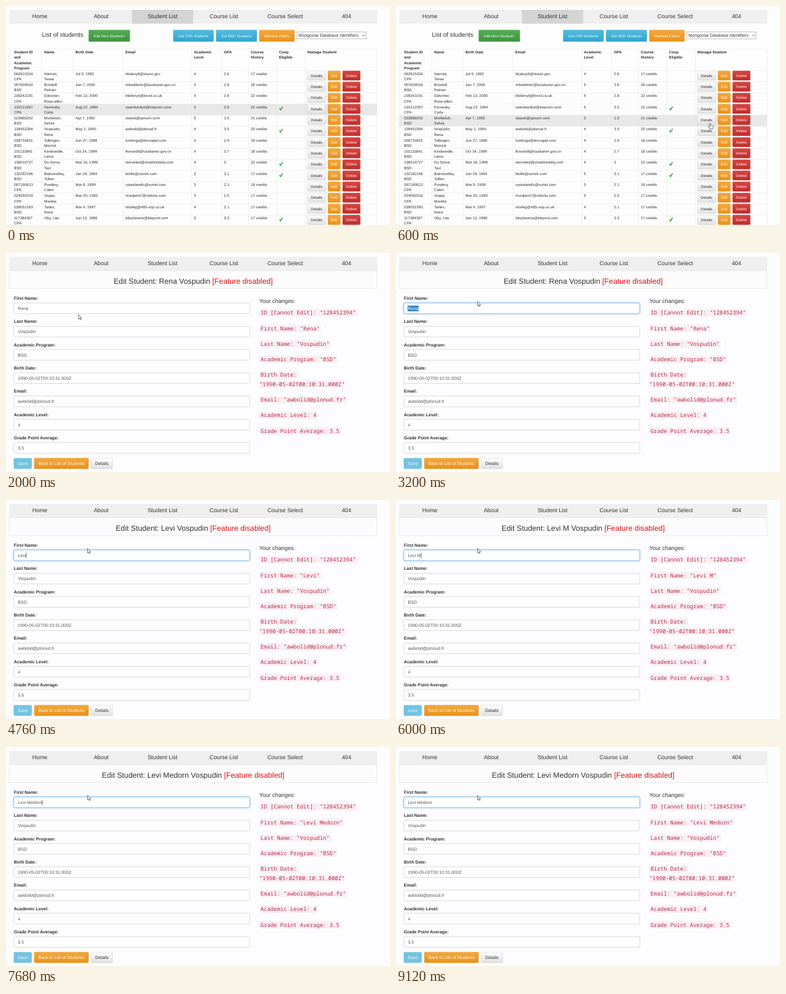
An HTML page that plays this animation: 600x342 px, repeating every 9160 ms.

```html
<!DOCTYPE html>
<html lang="en">
<head>
<meta charset="utf-8">
<title>Student list</title>
<style>
html, body { margin: 0; width: 100%; height: 100%; overflow: hidden; background: #fdfdfd; }
svg { display: block; width: 600px; height: 342px; text-rendering: geometricPrecision; }
text { font-family: "Liberation Sans", Arial, sans-serif; fill: #333; }
.mono { font-family: "Noto Sans Mono", "DejaVu Sans Mono", monospace; fill: #bd2650; }
.mid { text-anchor: middle; }
.bold { font-weight: bold; }
.white { fill: #fff; fill-opacity: .92; }
.field { fill: #555; }
.faded { fill: #e9f7fc; }
.line { stroke: #e0e0e0; stroke-width: .5; fill: none; }
</style>
</head>
<body>
<svg id="stage" viewBox="0 0 600 342"></svg>
<script>
const LOOP = 9160;
const SMALL = 5.9, BODY = 6.88, NAV = 8.87, TITLE = 11.8, CODE = 8.57;
const CHAR = CODE * 0.6;
const LAST = 'Vospudin';

const gradients = {
  green: ['#55ad55', '#3d923d'],
  blue: ['#55bbdc', '#2ea5cf'],
  orange: ['#f0a941', '#ea9219'],
  dark: ['#e99a2b', '#e58d14'],
  red: ['#d64642', '#bf2c2a'],
  gray: ['#fdfdfd', '#e1e1e1']
};
const edges = { green: '#3b8c3b', blue: '#2a9dc5', orange: '#e38d13', dark: '#d98a18', red: '#b92c28', gray: '#b4b4b4' };

// Text placed by the vertical centre of its capitals.
const txt = (x, y, s, size, cls = '', id = '') =>
  `<text x="${x}" y="${y + size * 0.35}" font-size="${size}" class="${cls}" ${id && `id="${id}"`}>${s}</text>`;

const box = (x, y, w, h, fill, extra = '') =>
  `<rect x="${x}" y="${y}" width="${w}" height="${h}" fill="${fill}" ${extra}/>`;

function button(x, y, w, h, tone, label, size, id = '') {
  const cls = tone === 'gray' ? 'mid' : 'mid white';
  return box(x, y, w, h, `url(#${tone})`,
    `rx="1.3" stroke="${edges[tone]}" stroke-width=".5" stroke-opacity=".6" ${id && `id="${id}"`}`) +
    txt(x + w / 2, y + h / 2, label, size, cls);
}

function nav(active) {
  const items = ['Home', 'About', 'Student List', 'Course List', 'Course Select', '404'];
  const step = 575 / 6;
  return box(5, 6, 575, 21.5, '#f0eff0') + items.map((s, i) =>
    (i === active ? box(5 + i * step, 6, step, 21.5, '#d4d4d5') : '') +
    txt(5 + (i + 0.5) * step, 16.2, s, NAV, 'mid')).join('');
}

/* ---------- list page ---------- */

const ROW_TOP = 101.1, ROW_H = 17.33, LEAD = 8.43;
const textX = [12.5, 59.5, 108.5, 186.5, 293.5, 340.5, 382.5, 426.5, 471];
const heads = ['Student ID|and|Academic|Program', 'Name', 'Birth Date', 'Email',
  'Academic|Level', 'GPA', 'Course|History', 'Coop|Eligible', 'Manage Student'];

// id and program, name, birth date, email, level, GPA, credits, eligible
const students = `
062915334|CPA;Harmot,|Tessa;Jul 5, 1992;trkaboy6@stavix.gov;4;2.6;17;
057639534|BSD;Brindolf,|Petrian;Jan 7, 2000;mboddentr@luuskaren.gov.cn;5;2.8;26;
109243191|CPA;Dalvinter,|Rose-ellen;Feb 13, 2000;kfollenyb@tirvol.co.uk;5;2.8;22;
132212367|CPA;Fernesby,|Corla;Aug 22, 1994;osembartlyd@kepvorn.com;5;3.5;22;y
023888252|BSD;Morbetich,|Selvia;Apr 7, 1992;sbavel@qovurn.com;5;1.5;21;
128452394|BSD;Vospudin,|Rena;May 1, 1990;awbolid@plonud.fr;4;3.5;20;y
028734631|BSD;Tolbrigen,|Merrick;Jun 27, 1998;tumbrigs@dorvapel.com;4;2.9;18;
101133841|BSD;Kestwardle,|Lenia;Oct 24, 1999;lkovardil@luuskaren.gov.cn;4;2.7;18;
136010727|BSD;Du Sorve,|Tavi;Mar 16, 1999;tsorveled@clostbrindely.com;4;3;22;y
132182166|BSD;Balmoretley,|Tolfen;Jan 18, 1994;btolfe@zumrk.com;5;3.1;17;y
097160613|CPA;Pondery,|Calen;Mar 9, 1999;cpondarellc@vurtel.com;5;2.1;18;
024050319|CPA;Vopps,|Marelia;Mar 20, 1993;mvolpeni7@xtdorlu.com;5;2.5;17;
039051593|BSD;Tarles,|Noira;Mar 4, 1997;ntorleg@485-vop.co.uk;4;2.1;17;
117384307|CPA;Oby, Lita;Jan 13, 1998;lobydarena@klepvot.com;5;3.3;17;y`.trim().split('\n').map(r => r.split(';'));

const lines = (x, y, s, cls) =>
  s.split('|').map((part, i) => txt(x, y + i * LEAD, part, SMALL, cls)).join('');

function tableRow(cells, i) {
  const y = ROW_TOP + i * ROW_H;
  const text = cells.slice(0, 7).map((s, c) => lines(textX[c], y + 4.4, c === 6 ? s + ' credits' : s)).join('');
  const tick = cells[7] ? `<path d="M427.2 ${y + 7}l1.9 2.2l3-5.2" fill="none" stroke="#229a2b" stroke-width="1.3"/>` : '';
  return text + tick +
    button(471, y + 0.2, 28.5, 14.8, 'gray', 'Details', SMALL) +
    button(503, y + 0.2, 19.5, 14.8, 'orange', 'Edit', SMALL, 'edit' + i) +
    button(526, y + 0.2, 27.5, 14.8, 'red', 'Delete', SMALL);
}

function listPage() {
  const across = students.map((_, i) => `M5 ${ROW_TOP + i * ROW_H}H579.5`).join('');
  const down = textX.slice(1).map(x => `M${x - 3.5} 67V342`).join('');
  return box(0, 0, 600, 342, '#fdfdfd') + nav(2) +
    txt(56, 45, 'List of students', 9.65) +
    button(129.3, 37.4, 64.2, 18.2, 'green', 'Add New Student+', SMALL) +
    button(261.3, 37.4, 63, 18.2, 'blue', 'Get CPA Students', SMALL) +
    button(328.3, 37.4, 63.6, 18.2, 'blue', 'Get BSD Students', SMALL) +
    button(395.8, 37.4, 55, 18.2, 'orange', 'Remove Filters', SMALL) +
    box(454.8, 40.5, 108, 10.6, '#fff', 'stroke="#999" stroke-width=".6"') +
    txt(457, 45.8, 'Mongoose Database Identifiers', 6.78) +
    '<path d="M556.8 45l2 2l2-2" fill="none" stroke="#444" stroke-width=".8"/>' +
    box(5, ROW_TOP, 574.5, ROW_H, '#e8e8e8', 'id="hover"') +
    `<path class="line" d="M5 342V67H579.5V342${across}${down}"/>` +
    heads.map((s, c) => lines(textX[c], 72, s, 'bold')).join('') +
    students.map(tableRow).join('');
}

/* ---------- edit page ---------- */

const fields = [['First Name', 'Rena'], ['Last Name', LAST], ['Academic Program', 'BSD'],
  ['Birth Date', '1990-05-02T00:10:31.000Z'], ['Email', 'awbolid@plonud.fr'],
  ['Academic Level', '4'], ['Grade Point Average', '3.5']];

function field([label, value], i) {
  const y = i * 36.33;
  return txt(12.3, y + 70.7, label + ':', BODY, 'bold') +
    box(12.2, y + 78.1, 368.6, 16.6, '#fff', `rx="1.8" stroke="#ccc" stroke-width=".7" ${i ? '' : 'id="first"'}`) +
    (i ? txt(18.5, y + 86.5, value, BODY, 'field')
       : box(18.2, 82.2, 17, 8.8, '#2f7fc4', 'id="selection"') + txt(18.5, 86.5, value, BODY, 'field', 'value') +
         box(0, 82.6, 0.6, 8, '#222', 'id="caret"'));
}

function code(y, s, pad = 2, id = '') {
  return box(395.7, y - 5.8, s.length * CHAR + 2 * pad, 11.6, '#f8f0f3', `rx="1.8" ${id && `id="${id}Box"`}`) +
    txt(395.7 + pad, y, s, CODE, 'mono', id);
}

function editPage() {
  return box(0, 0, 600, 342, '#fdfcfe') + nav(-1) +
    box(5, 27.6, 574.8, 28.2, '#fdfcfd', 'stroke="#dedede" stroke-width=".6"') +
    `<text x="292.5" y="48.4" font-size="${TITLE}" class="mid">Edit Student: <tspan id="name"></tspan> <tspan fill="#dd1018">[Feature disabled]</tspan></text>` +
    fields.map(field).join('') +
    box(12, 320.3, 28.4, 16.6, '#73c4e0', 'rx="1.8"') + txt(26.2, 328.6, 'Save', BODY, 'mid faded') +
    button(44.2, 320.3, 84.8, 16.6, 'orange', 'Back to List of Students', BODY) +
    button(133, 320.3, 33.6, 16.6, 'gray', 'Details', BODY) +
    txt(395.7, 75.2, 'Your changes:', NAV) +
    code(93.2, 'ID [Cannot Edit]: "128452394"') +
    code(117.6, 'First Name: "Rena"', 2, 'change') +
    code(142, `Last Name: "${LAST}"`) +
    code(166, 'Academic Program: "BSD"') +
    code(190.2, 'Birth Date:') +
    code(204.8, '"1990-05-02T00:10:31.000Z"', 0) +
    code(229.2, 'Email: "awbolid@plonud.fr"') +
    code(253.4, 'Academic Level: 4') +
    code(277.6, 'Grade Point Average: 3.5');
}

const ink = 'stroke="#222" stroke-width=".6" stroke-linejoin="round"';
const pointers = `<g id="cursor">
  <path id="arrow" d="M0 0V7.2L1.7 5.7L2.8 8.2L3.9 7.7L2.8 5.3H4.9Z" fill="#fff" ${ink}/>
  <path id="hand" d="M-.8 .7Q0-.4 .8 .7V3.6L4.3 4.5Q5.2 5 5 6.2L4.1 9.2H-.5L-2.7 5.6Q-2.5 4.5-1.5 5.3L-.8 6Z" fill="#fff" ${ink}/>
  <path id="beam" d="M-1.2-3.6H1.2M0-3.6V3.6M-1.2 3.6H1.2" fill="none" ${ink}/>
</g>`;

const defs = Object.entries(gradients).map(([id, [a, b]]) =>
  `<linearGradient id="${id}" x2="0" y2="1"><stop stop-color="${a}"/><stop offset="1" stop-color="${b}"/></linearGradient>`).join('');

document.getElementById('stage').innerHTML =
  `<defs>${defs}</defs><g id="list">${listPage()}</g><g id="form">${editPage()}</g>${pointers}`;

/* ---------- motion ---------- */

const $ = id => document.getElementById(id);
const show = (id, on) => { $(id).style.display = on ? '' : 'none'; };
const pen = document.createElement('canvas').getContext('2d');
pen.font = `100px "Liberation Sans", Arial, sans-serif`;

const OPEN = 1760, FOCUS = 2680, SELECT = 2800;
const TYPED = 'Levi Medorn';
const keyTimes = [4000, 4240, 4440, 4640, 4920, 5920, 6400, 6600, 7120, 7280, 7440];

// time, x, y of the pointer
const path = [[80, 440, 160], [920, 515, 193.5], [1000, 515, 193.5], [1160, 517.3, 195], [OPEN, 517.3, 195],
  [1960, 113.5, 96.2], [2080, 113.5, 96.2], [2600, 32, 87], [2880, 32, 87], [3160, 127.5, 75.5]];

function pointer(t) {
  const k = path.findIndex(p => p[0] > t);
  if (k < 1) return k ? path.at(-1).slice(1) : path[0].slice(1);
  const [t0, x0, y0] = path[k - 1], [t1, x1, y1] = path[k];
  const u = (t - t0) / (t1 - t0), e = u * u * (3 - 2 * u);
  return [x0 + (x1 - x0) * e, y0 + (y1 - y0) * e];
}

function drawList(x, y) {
  const row = Math.floor((y - ROW_TOP) / ROW_H);
  $('hover').setAttribute('y', ROW_TOP + row * ROW_H);
  const over = x > 503 && x < 522.5;
  students.forEach((_, i) => $('edit' + i).setAttribute('fill', `url(#${over && i === row ? 'dark' : 'orange'})`));
  return over || (x > 471 && x < 499.5) ? 'hand' : 'arrow';
}

function drawForm(t, x, y) {
  const n = keyTimes.filter(k => k <= t).length;
  const first = n ? TYPED.slice(0, n) : 'Rena';
  const selected = t >= SELECT && !n;
  const focused = t >= FOCUS;
  $('name').textContent = `${first.trim()} ${LAST}`;
  $('value').textContent = first;
  $('value').style.fill = selected ? '#fff' : '';
  $('change').textContent = `First Name: "${first}"`;
  $('changeBox').setAttribute('width', (first.length + 14) * CHAR + 4);
  $('first').setAttribute('stroke', focused ? '#66afe9' : '#ccc');
  $('first').style.filter = focused ? 'drop-shadow(0 0 1.6px rgba(102,175,233,.7))' : '';
  show('selection', selected);
  const since = t - (n ? keyTimes[n - 1] : FOCUS);
  show('caret', focused && !selected && since % 1000 < 400);
  $('caret').setAttribute('x', 18.6 + pen.measureText(first).width * BODY / 100);
  return y > 78 && y < 95 && x < 381 ? 'beam' : 'arrow';
}

function frame(now) {
  const t = now % LOOP, [x, y] = pointer(t);
  const editing = t >= OPEN;
  show('list', !editing);
  show('form', editing);
  const shape = editing ? drawForm(t, x, y) : drawList(x, y);
  show('cursor', t >= 80);
  $('cursor').setAttribute('transform', `translate(${x} ${y})`);
  for (const id of ['arrow', 'hand', 'beam']) show(id, id === shape);
  requestAnimationFrame(frame);
}
frame(performance.now());
</script>
</body>
</html>
```
